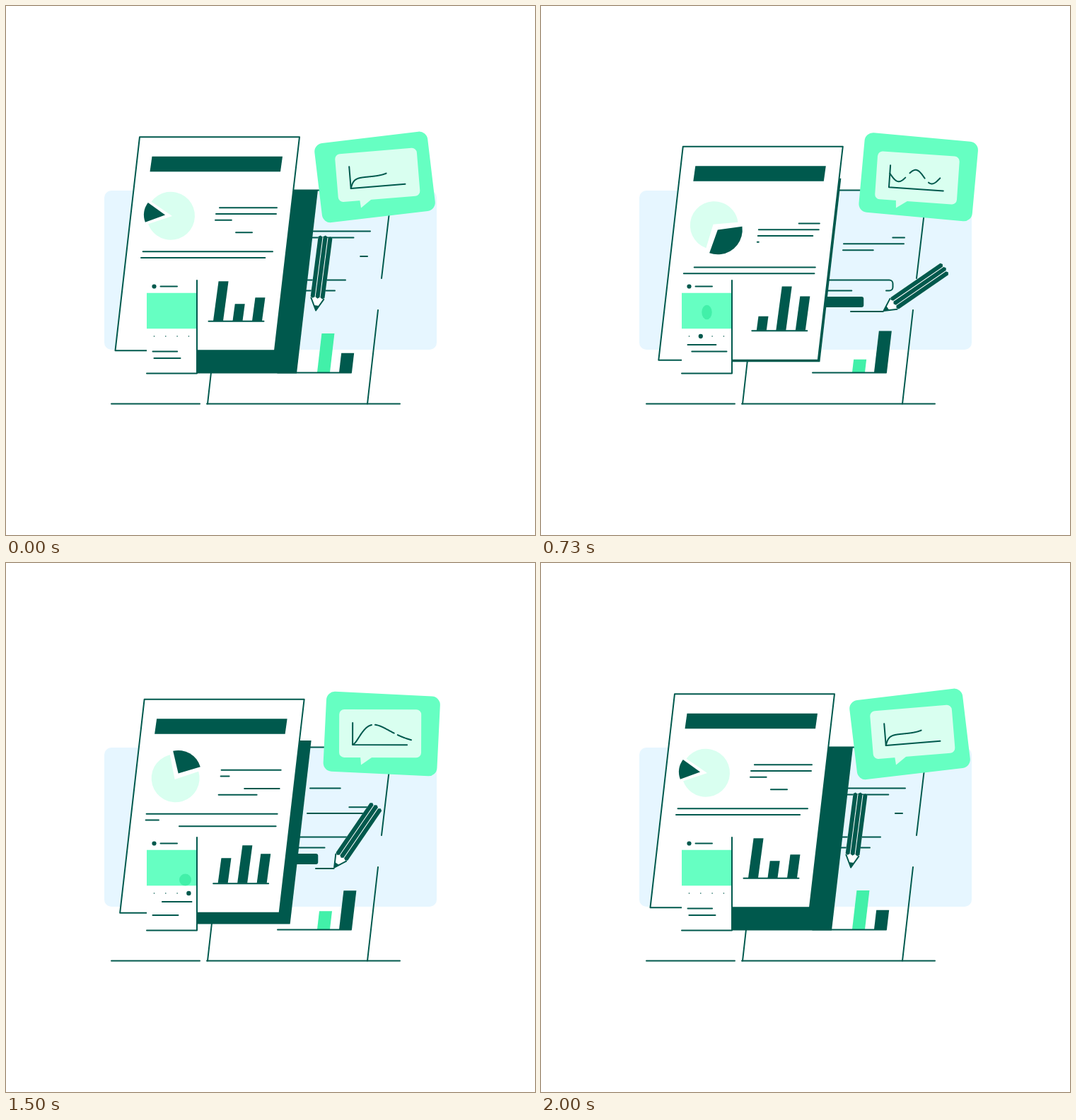
An HTML page with a canvas for the animation above (2.03 s loop, 748 px wide and 748 px high).

```html
<!DOCTYPE html>
<html lang="en">
<head>
<meta charset="utf-8">
<title>Reports</title>
<style>
html, body { margin: 0; width: 100%; height: 100%; overflow: hidden; background: #fff; }
canvas { display: block; width: 100%; height: 100%; }
</style>
</head>
<body>
<canvas id="stage" width="748" height="748"></canvas>
<script>
const ctx = document.getElementById('stage').getContext('2d');
const DARK = '#00594d', GREEN = '#42f0a9', MINT = '#66ffc2', PALE = '#d9fff0', SKY = '#e6f6ff';
const LOOP = 2030, CYCLE = 2000;
let now = 0;

const wrap = t => (t % CYCLE + CYCLE) % CYCLE;

// 0 to 1 and back once per cycle
const pingPong = t => 1 - Math.abs(1 - wrap(t) / 1000);
function swing(t, power = 4) {
  const p = pingPong(t), half = q => (2 * q) ** power / 2;
  return p < .5 ? half(p) : 1 - half(1 - p);
}
// Rises fast, settles slowly
const surge = t => Math.sin(pingPong(t) * Math.PI / 2);

function smooth(p) {
  p = Math.max(0, Math.min(1, p));
  return p * p * (3 - 2 * p);
}
const ramp = (start, time) => smooth((now - start) / time);

function path(pts) {
  ctx.beginPath();
  for (let i = 0; i < pts.length; i += 2) ctx.lineTo(pts[i], pts[i + 1]);
}
function line(...pts) { path(pts); ctx.stroke(); }
function poly(color, ...pts) { path(pts); ctx.fillStyle = color; ctx.fill(); }
function box(color, x, y, w, h, r) {
  ctx.beginPath();
  ctx.roundRect(x, y, w, h, r);
  ctx.fillStyle = color;
  ctx.fill();
}
function oval(color, x, y, rx, ry = rx) {
  ctx.beginPath();
  ctx.ellipse(x, y, rx, ry, 0, 0, 7);
  ctx.fillStyle = color;
  ctx.fill();
}
function sector(color, x, y, cx, cy, r, from, to) {
  ctx.beginPath();
  ctx.moveTo(x, y);
  ctx.arc(cx, cy, r, from, to);
  ctx.fillStyle = color;
  ctx.fill();
}
function placed(x, y, deg, draw) {
  ctx.save();
  ctx.translate(x, y);
  ctx.rotate(deg * Math.PI / 180);
  draw();
  ctx.restore();
}
function bar(color, x, base, w, h, lean) {
  poly(color, x, base, x + h * lean, base - h, x + w + h * lean, base - h, x + w, base);
}

// Text lines that write themselves, stay, then leave by their end, one after another
function rows(x, y, lean, gap, lengths, { start, stagger, hold, time }) {
  lengths.forEach((len, i) => {
    const t = wrap(now - start - i * stagger), left = x + lean * i, top = y + gap * i;
    const from = len * smooth((t - hold) / time), to = len * smooth(t / time);
    if (to - from > .5) line(left + from, top, left + to, top);
  });
}

function backSheet(e, late) {
  box(SKY, 139, 261, 470, 225, 10);
  line(319, 260.5, 545, 260.5);
  line(319, 260.5, 285, 562.5);
  line(541.5, 296, 531, 385);
  line(526, 430, 511, 562.5);
  line(149, 562.5, 274, 562.5);
  line(284, 562.5, 557, 562.5);
  rows(430, 318.5, -1, 8.9, Array(5).fill(85), { start: 1220, stagger: 410, hold: 700, time: 560 });

  // Input frame, its corner drawn last
  ctx.save();
  ctx.setLineDash([80 + 40 * e, 300]);
  ctx.beginPath();
  ctx.moveTo(400, 387.5);
  ctx.arcTo(497.5, 387.5, 497.5, 395, 5);
  ctx.arcTo(497.5, 402.5, 490, 402.5, 5);
  ctx.lineTo(488, 402.5);
  ctx.stroke();
  ctx.restore();
  line(390, 402.5, 465 - 27 * e, 402.5);
  box(DARK, 380, 411, 42 + 36 * e, 15, 3);

  bar(GREEN, 440, 518, 18, 55 - 41 * late, .117);
  bar(DARK, 471, 518, 18, 23 + 41 * surge(now - 67), .117);
  line(384, 518.5, 488, 518.5);
}

function pie(x, y) {
  // Two turns out, two turns back
  const turn = (ramp(0, 400) + ramp(370, 400) - ramp(900, 400) - ramp(1480, 400)) / 2;
  const from = (160 + 195 * turn) * Math.PI / 180, to = from + (56 + 62 * turn) * Math.PI / 180;
  const dx = Math.cos((from + to) / 2), dy = Math.sin((from + to) / 2);
  const px = x + 8 * dx, py = y + 8 * dy;
  sector(PALE, x - 2 * dx, y - 2 * dy, x, y, 34, to, from + 2 * Math.PI);
  sector(DARK, px, py, px, py, 30 + 5 * turn, from, to);
}

function frontSheet(e) {
  const sx = -17.5 * e, sy = -17 * e;
  poly(DARK, 280 + sx, 260 + sy, 441 + sx, 260 + sy, 411 + sx, 519.5 + sy, 250 + sx, 519.5 + sy);
  ctx.save();
  ctx.translate(189 + 12.4 * e, 185.2 + 14.2 * e);
  path([0, 0, 226, 0, 191, 302, -34.5, 302]);
  ctx.closePath();
  ctx.fillStyle = '#fff';
  ctx.fill();
  ctx.stroke();
  poly(DARK, 17.5, 27.5, 202, 27.5, 199, 49, 14.5, 49);
  pie(44, 111.5);
  rows(109, 100, -1, 8.75, [85, 85, 85, 85, 54], { start: 920, stagger: 435, hold: 1000, time: 620 });
  rows(3, 162, -1, 8.75, [185, 185, 185], { start: 710, stagger: 645, hold: 1250, time: 750 });
  [56 - 38 * e, 24 + 42 * surge(now), 33 + 16 * e].forEach((h, i) => bar(DARK, 104 + 27.5 * i, 260, 14, h, .135));
  line(97.5, 260.5, 175.5, 260.5);
  ctx.restore();
}

function card() {
  poly('#fff', 199, 388, 270, 388, 270, 519, 199, 519);
  oval(DARK, 209.5, 396.5, 3.1);
  line(218.5, 396.5, 242, 396.5);
  ctx.save();
  ctx.beginPath();
  ctx.rect(199, 405.5, 71, 51);
  ctx.clip();
  ctx.fillStyle = MINT;
  ctx.fill();
  // A drop swells, falls, then rolls right and out to the left
  const grow = ramp(340, 520), r = 8.5 * grow;
  oval(GREEN, 234.5 + 19 * ramp(1100, 400) - 66 * ramp(1540, 380), 433 + 15 * ramp(800, 500),
    r, r + 6 * grow * (1 - grow) * 4);
  ctx.restore();

  for (let i = 0; i < 4; i++) {
    const near = smooth(1 - Math.abs(now - 380 - 375 * i) / 260);
    oval(DARK, 209.5 + 16.3 * i, 467, .8 + 2.4 * near);
  }
  rows(207.5, 479, 0, 9.5, [55, 55, 39], { start: 2240, stagger: -680, hold: 1020, time: 750 });
  line(270, 388, 270, 519.5, 199, 519.5);
}

function pencil(e) {
  const tip = 438 + 47 * swing(now - 10, 5);
  if (tip > 438.5) line(438, 432, tip, 432);
  placed(tip, 431.5, 7.4 + 50.5 * e, () => {
    poly('#fff', -10, -105, 10, -105, 10, -18, 0, 0, -10, -18);
    line(-9, -18, 0, -1, 9, -18);
    poly(DARK, -4, -8, 4, -8, 0, 0);
    for (const x of [-7, 0, 7]) {
      const top = x ? -105 : -106;
      poly(DARK, x - 3, top, x, top - 2, x + 3, top, x + 3, -20, x, -18, x - 3, -20);
    }
  });
}

// One curve blended from three: a plateau, a wave and a hill, with two breaks
function graph() {
  const toHill = ramp(850, 350), wave = ramp(100, 400) - toHill, hill = toHill - ramp(1480, 400);
  const rest = 1 - wave - hill;
  const plateauY = u => 242.5 + 14.5 * Math.exp(-12 * u) - 3 * u ** 6;
  const waveY = u => 239 + 9 * Math.cos((u - .18) / .65 * 2 * Math.PI);
  const hillY = u => 256.5 - 28 * (u / .36 * Math.exp(1 - u / .36)) ** 2;
  const width = 52 * rest + 72 * wave + 84 * hill;
  const gap = .04 * Math.sin(now / CYCLE * Math.PI);
  let pen = false;
  ctx.beginPath();
  for (let u = 0; u <= 1; u += .01) {
    const open = Math.abs(u - .35) < gap || Math.abs(u - .73) < gap;
    const x = 490 + width * u, y = rest * plateauY(u) + wave * waveY(u) + hill * hillY(u);
    if (!open) pen ? ctx.lineTo(x, y) : ctx.moveTo(x, y);
    pen = !open;
  }
  ctx.stroke();
}

function bubble(e, late) {
  placed(528.4, 299.5, -6.8 + 13.4 * late, () => box(MINT, -80.5, -114.5, 161, 113, 12));
  placed(502, 285, -4.7 + 9.1 * e, () => {
    ctx.translate(-502, -285);
    box(PALE, 471, 207, 116, 68, 7);
    poly(PALE, 501, 273, 520, 273, 502, 285.5);
    line(490, 226, 490, 257, 567, 257);
    graph();
  });
}

function draw(time) {
  now = Math.min(time % LOOP, CYCLE);
  const e = swing(now - 10), late = swing(now - 67);
  ctx.fillStyle = '#fff';
  ctx.fillRect(0, 0, 748, 748);
  ctx.strokeStyle = DARK;
  ctx.lineWidth = 2;
  ctx.lineCap = ctx.lineJoin = 'round';
  backSheet(e, late);
  frontSheet(e);
  card();
  pencil(e);
  bubble(e, late);
}

const begin = performance.now();
function tick() {
  draw(performance.now() - begin);
  requestAnimationFrame(tick);
}
tick();
</script>
</body>
</html>
```
